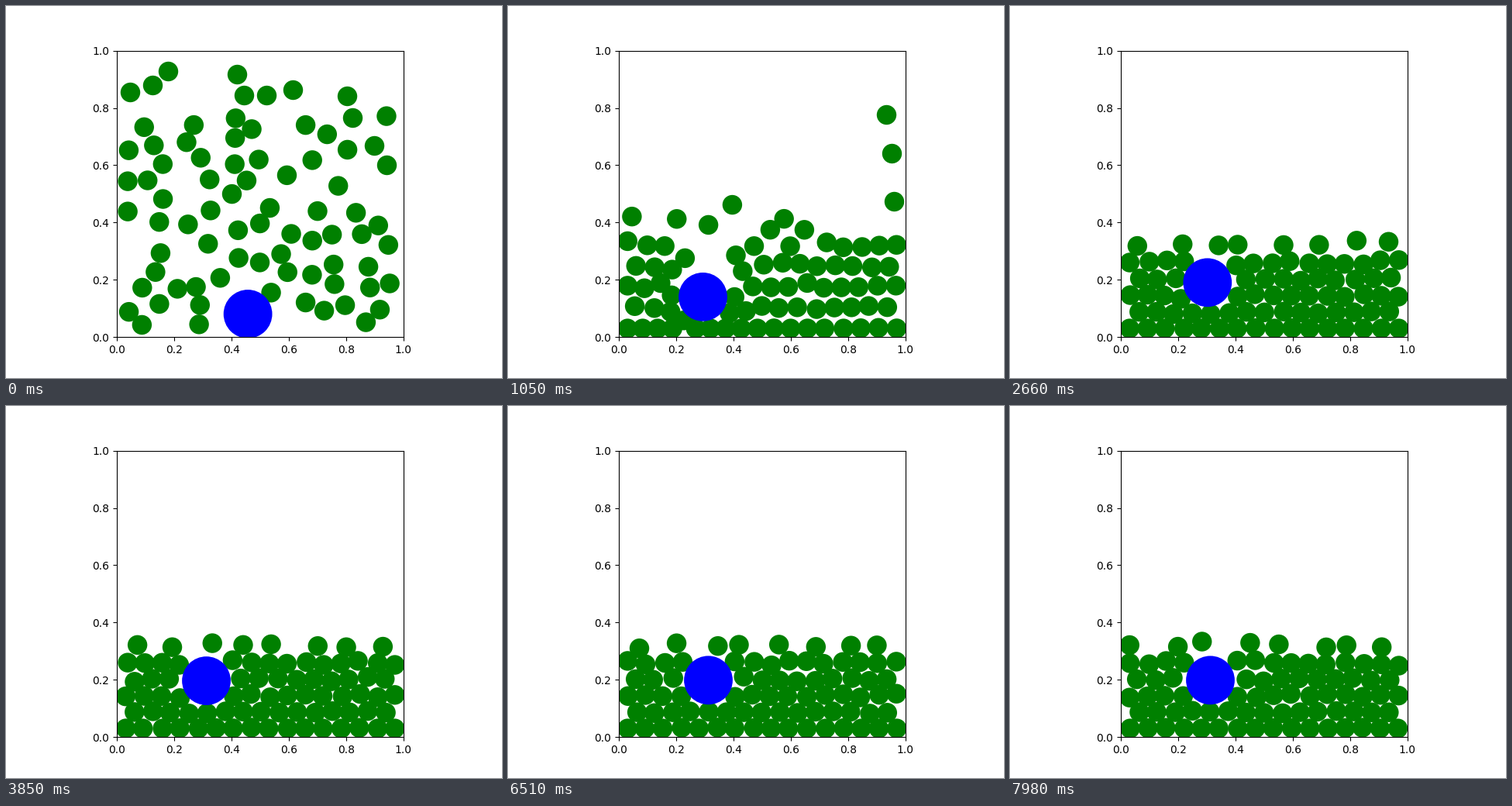
Animation of 640 by 480 pixels, one loop 8 s. Source, as a matplotlib script:

```python
import numpy as np
import matplotlib.pyplot as plt
from matplotlib.animation import FuncAnimation

LOOP, INTERVAL, HOLD, STEPS = 8000, 40, 70, 115   # times in ms
R, BIG_R = 0.03, 0.08
COLUMNS, ROW_GAP = 16, 0.057
GAP = (1 - 2 * R) / (COLUMNS - 1)
REST = 0.312 + 0.198j              # where the big ball ends up
FLIGHT, LANDING = 1.05, 1.75       # s, for the balls thrown up at the right

rng = np.random.default_rng(12)


def unit(x, y):
    """Stage pixel to a point in the axes, as a complex number."""
    return complex((x + 0.5 - 143.2) / 369.6, (427.2 - y - 0.5) / 369.6)


FLYERS = [unit(440, 116), unit(475, 180), unit(491, 205)]
FLYER_MIDS = [unit(488, 140), unit(495, 190), unit(498, 252)]
TOP = [unit(160, 111), unit(189, 102), unit(209, 84), unit(298, 88),
       unit(307, 115), unit(336, 115), unit(370, 108), unit(447, 144)]


def big_at(t):
    keys = [0, 1.05, 2.66, 3.85]
    x = np.interp(t, keys, [0.457, 0.293, 0.302, REST.real])
    y = np.interp(t, keys, [0.0805, 0.141, 0.192, REST.imag])
    return complex(x, y + 0.002 * np.sin(4.3 * t) * min(t / 3, 1))


def make_slots():
    """Staggered rows with a hole for the big ball and a sparse top row."""
    slots = []
    for row in range(5):
        odd = row % 2
        for k in range(COLUMNS - odd):
            z = complex(R + GAP * (k + odd / 2), R + ROW_GAP * row)
            if abs(z - REST) > 0.1:
                slots.append(z)
    top = [complex(GAP * (2 * k + 1), R + ROW_GAP * 5.1) for k in range(8)]
    return np.array(slots + top)


def make_start(count):
    """Scatter balls without overlap below the given top ones."""
    spots = list(TOP)
    while len(spots) < count:
        z = complex(rng.uniform(0.035, 0.965), rng.uniform(0.035, 0.78))
        clear = all(abs(z - s) > 0.064 for s in spots + FLYERS)
        if clear and abs(z - big_at(0)) > R + BIG_R:
            spots.append(z)
    return np.array(spots)


def match_rows(start, slots):
    """Low balls fill low rows, each row from left to right."""
    start = start[np.argsort(start.imag)]
    levels = np.round(slots.imag, 6)
    for level in np.unique(levels):
        row = levels == level
        start[row] = np.sort_complex(start[row])
    return start


slots = make_slots()
count = len(slots)
start = match_rows(make_start(count - 3), slots[:-3])
start = np.append(start, FLYERS)
drop = np.abs(start.imag - slots.imag)
fall = 0.25 + np.sqrt(1.25 * drop)
speeds = rng.uniform(4, 13, (4, count))
phases = rng.uniform(0, 2 * np.pi, (4, count))

reach = np.full((count + 1, count + 1), 2 * R)
reach[-1, :] = reach[:, -1] = R + BIG_R
np.fill_diagonal(reach, 0)


def wander(t):
    a, b, c, d = np.sin(speeds * t + phases)
    loose = 1 + 1.5 * np.exp(-1.5 * t)
    wide = np.where(slots.imag > 0.3, 0.02, 0.002 + 0.012 * slots.imag)
    high = 0.001 + 0.02 * slots.imag
    return loose * (wide * (a + b) + 1j * high * (c + d))


def pile_at(t):
    """The heap: loose and high at first, then packed around the big ball."""
    stretch = 1 + 0.3 * min(1, np.exp(-2.5 * (t - FLIGHT)))
    y = R + (slots.imag - R) * stretch
    sag = R + (REST.imag - R) * stretch - big_at(t).imag
    y -= sag * np.exp(-((slots.real - REST.real) / 0.1) ** 2)
    return slots.real + 1j * np.maximum(y, R) + wander(t)


def throw(t, a, b, c):
    """Parabola through a at 0, b at FLIGHT and c at LANDING."""
    ab, bc = (b - a) / FLIGHT, (c - b) / (LANDING - FLIGHT)
    return a + ab * t + (bc - ab) / LANDING * t * (t - FLIGHT)


def inside(p):
    return np.clip(p.real, R, 1 - R) + 1j * np.clip(p.imag, R, 1 - R)


def push_apart(p, big):
    p = inside(p)
    for _ in range(14):
        every = np.append(p, big)
        diff = p[:, None] - every
        dist = np.abs(diff) + 1e-9
        shift = np.maximum(reach[:-1] - dist, 0) * diff / dist
        p = inside(p + 0.4 * shift[:, :-1].sum(axis=1) + shift[:, -1])
    return np.append(p, big)


def state_at(t):
    pile = pile_at(t)
    u = np.minimum(t / fall, 1) ** 2
    p = start + (pile - start) * u
    if t < LANDING:
        for k in range(3):
            p[k - 3] = throw(t, FLYERS[k], FLYER_MIDS[k], pile[k - 3])
    p = push_apart(p, big_at(t))
    return np.column_stack([p.real, p.imag])


states = [state_at(k * HOLD / 1000) for k in range(STEPS)]

fig, ax = plt.subplots(figsize=(6.4, 4.8), dpi=100)
ax.set_aspect("equal")
ax.set_xlim(0, 1)
ax.set_ylim(0, 1)
balls = ax.scatter(*states[0].T, s=[18.3 ** 2] * count + [45.2 ** 2],
                   c=["green"] * count + ["blue"], linewidths=0)


def draw(i):
    step = min((i * INTERVAL + 30) // HOLD, STEPS - 1)
    balls.set_offsets(states[step])
    return balls,


def reset():
    return draw(0)


anim = FuncAnimation(fig, draw, frames=LOOP // INTERVAL, init_func=reset,
                     interval=INTERVAL, repeat=True, repeat_delay=0)
plt.show()
```
